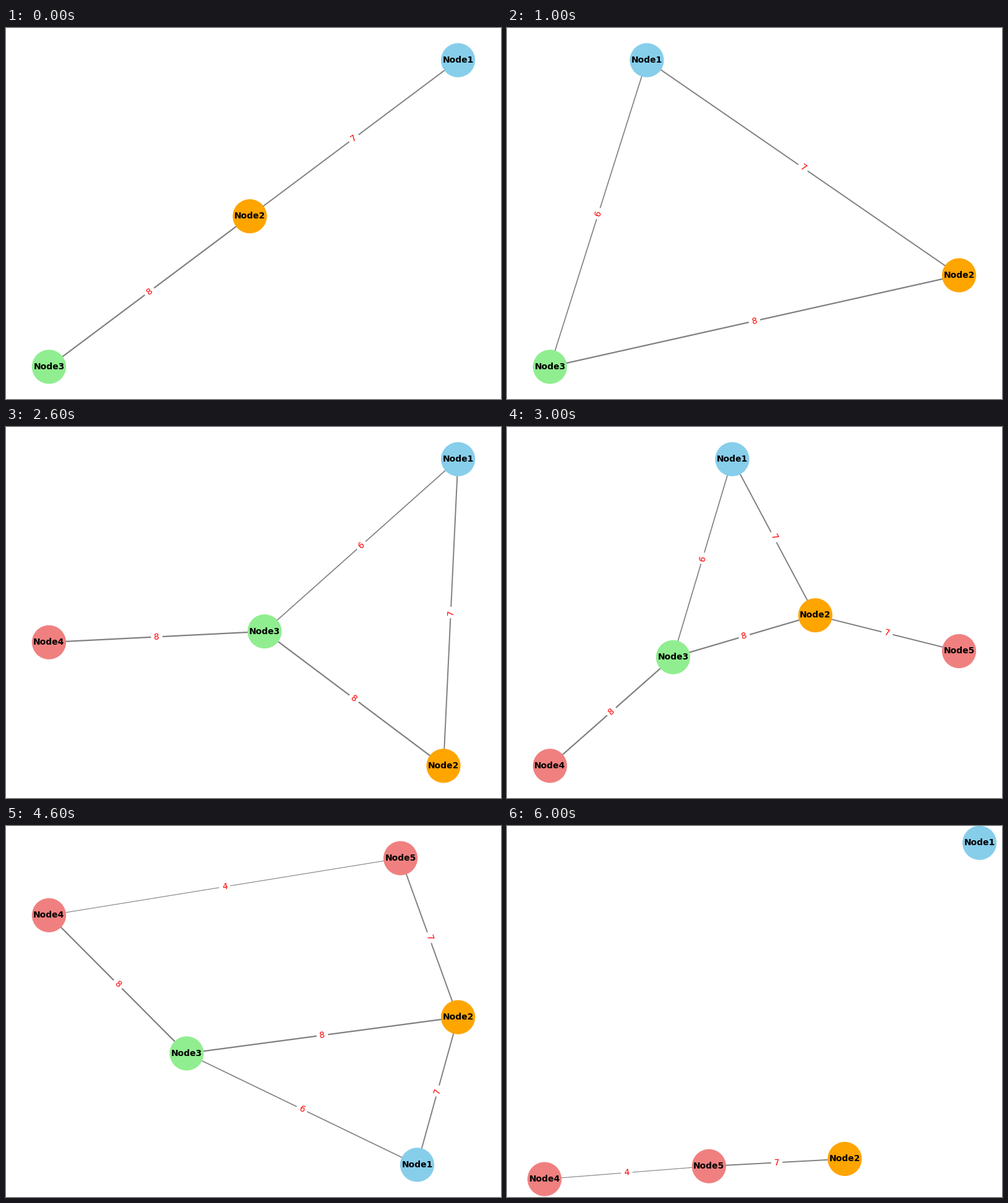
A matplotlib script that plays this animation: 800 px wide and 600 px high, repeating every 7 s.

```python
import math

import matplotlib.pyplot as plt
from matplotlib.animation import FuncAnimation
from matplotlib.collections import LineCollection

W, H = 800, 600
# Outermost nodes sit on these lines once the layout is scaled with margins.
L, R = W / 2 - W / 2.42, W / 2 + W / 2.42
T, B = H / 2 - H / 2.42, H / 2 + H / 2.42

COLORS = {1: "skyblue", 2: "orange", 3: "lightgreen", 4: "lightcoral", 5: "lightcoral"}
WEIGHTS = {(1, 2): 7, (1, 3): 6, (2, 3): 8, (3, 4): 8, (2, 5): 7, (4, 5): 4}

# Each step: node positions in pixels, and the links present.
STEPS = [
    ({1: (R, T), 2: (394, 304.5), 3: (L, B)},
     [(1, 2), (2, 3)]),
    ({1: (226, T), 2: (R, 399.9), 3: (L, B)},
     [(1, 2), (1, 3), (2, 3)]),
    ({1: (R, T), 2: (707, B), 3: (417.9, 330.6), 4: (L, 348.2)},
     [(1, 2), (1, 3), (2, 3), (3, 4)]),
    ({1: (364, T), 2: (498.3, 304.5), 3: (268.4, 372.3), 4: (L, B), 5: (R, 362.5)},
     [(1, 2), (1, 3), (2, 3), (2, 5), (3, 4)]),
    ({1: (664.5, B), 2: (R, 309.2), 3: (292, 367.8), 4: (L, 144.3), 5: (637.6, T)},
     [(1, 2), (1, 3), (2, 3), (2, 5), (3, 4), (4, 5)]),
    ({1: (L, 89), 2: (558, T), 3: (332.5, 215.5), 4: (488, B), 5: (R, 314.4)},
     [(1, 3), (2, 3), (2, 5), (3, 4), (4, 5)]),
    ({1: (763.64, 27.27), 2: (545.8, 538.4), 4: (60.62, 571.1), 5: (326.4, 550.2)},
     [(2, 5), (4, 5)]),
]

plt.rcParams["font.family"] = "DejaVu Sans"
fig = plt.figure(figsize=(W / 100, H / 100), dpi=100, facecolor="white")
ax = fig.add_axes([0, 0, 1, 1])


def upright_angle(a, b):
    """Angle of the line a-b in degrees, turned so text is never upside down."""
    angle = math.degrees(math.atan2(a[1] - b[1], b[0] - a[0]))
    if angle > 90:
        angle -= 180
    elif angle < -90:
        angle += 180
    return angle


def draw_links(pos, links):
    ax.add_collection(LineCollection(
        [(pos[a], pos[b]) for a, b in links], colors="gray",
        linewidths=[WEIGHTS[link] * 0.2 for link in links], zorder=1))
    for link in links:
        a, b = (pos[n] for n in link)
        ax.text((a[0] + b[0]) / 2, (a[1] + b[1]) / 2, str(WEIGHTS[link]),
                size=10, color="red", ha="center", va="center",
                rotation=upright_angle(a, b), zorder=1,
                bbox=dict(boxstyle="round", ec="white", fc="white"))


def draw_nodes(pos):
    xs, ys = zip(*pos.values())
    ax.scatter(xs, ys, s=1500, c=[COLORS[n] for n in pos], zorder=2)
    for n, (x, y) in pos.items():
        ax.text(x, y, f"Node{n}", size=10, weight="bold", color="black",
                ha="center", va="center", zorder=3)


def update(i):
    ax.clear()
    ax.set_axis_off()
    pos, links = STEPS[i]
    draw_links(pos, links)
    draw_nodes(pos)
    ax.set_xlim(0, W)
    ax.set_ylim(H, 0)
    return []


anim = FuncAnimation(fig, update, frames=len(STEPS), interval=1000, repeat=True)
plt.show()
```
